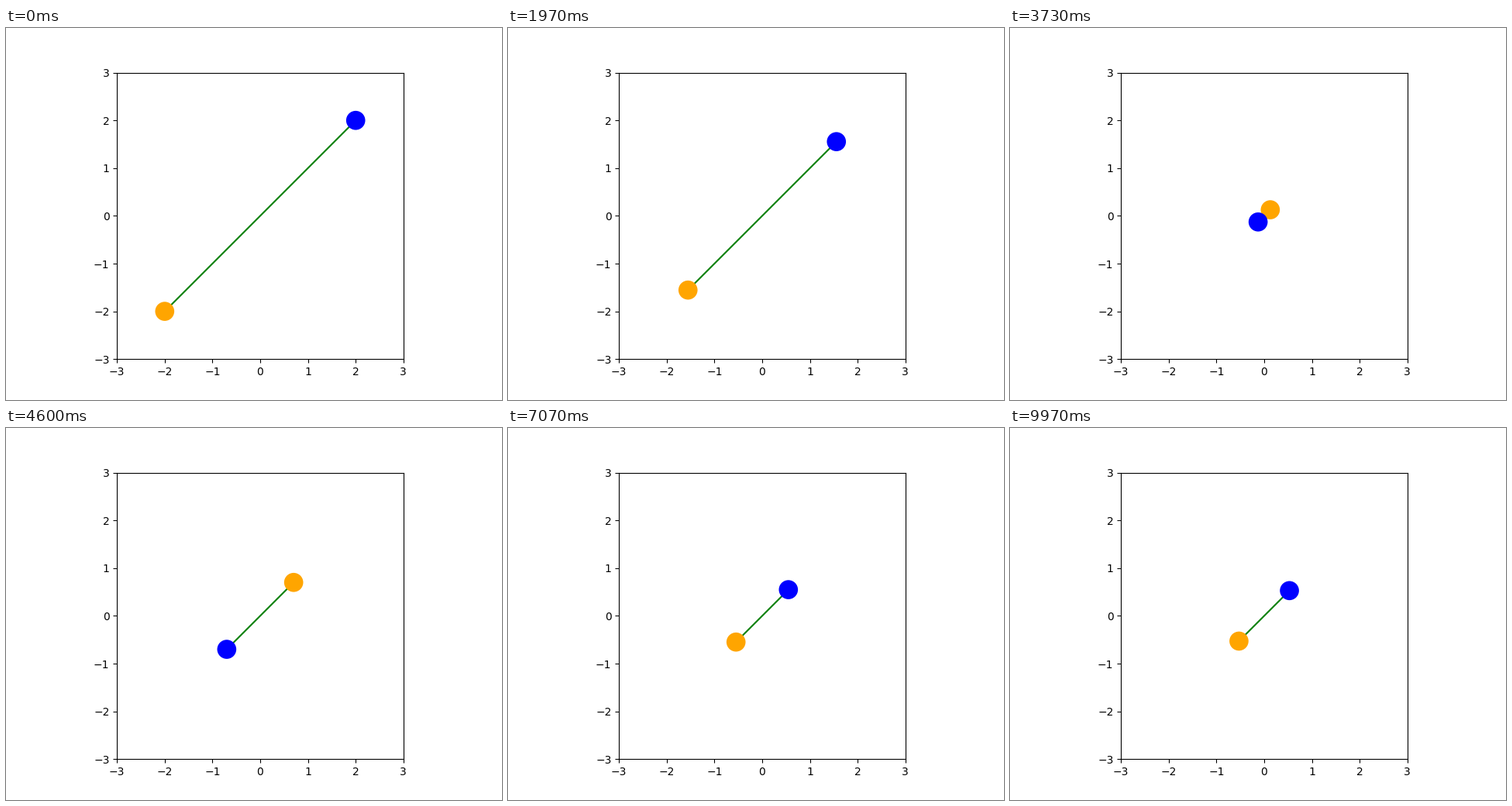
Animation of 640x480 px, one loop 10000 ms. Source, as a matplotlib script:

```python
import numpy as np
import matplotlib.pyplot as plt
from matplotlib.animation import FuncAnimation
from matplotlib.patches import Circle

FRAMES = 300
DURATION = 10.0     # seconds
START = 2.0         # initial offset of each mass on the diagonal
OMEGA = 6.3248      # angular frequency
DAMPING = 0.125     # decay rate
RADIUS = 0.2

# Damped oscillation released from rest
t = np.linspace(0, DURATION, FRAMES)
offset = START * np.exp(-DAMPING * t) * (
    np.cos(OMEGA * t) + DAMPING / OMEGA * np.sin(OMEGA * t))

fig, ax = plt.subplots(figsize=(6.4, 4.8), dpi=100)
ax.set_aspect("equal")
ax.set_xlim(-3, 3)
ax.set_ylim(-3, 3)
ax.set_xticks(range(-3, 4))
ax.set_yticks(range(-3, 4))

spring, = ax.plot([], [], color="green", lw=1.5, zorder=2)


def add_mass(color, zorder):
    return ax.add_patch(Circle((0, 0), RADIUS, fc=color, zorder=zorder))


orange = add_mass("orange", 3)
blue = add_mass("blue", 4)


def update(i):
    d = offset[i]
    blue.center = (d, d)
    orange.center = (-d, -d)
    spring.set_data([-d, d], [-d, d])
    return spring, orange, blue


anim = FuncAnimation(fig, update, frames=FRAMES, interval=1000 * DURATION / FRAMES,
                     repeat=True, repeat_delay=0)
plt.show()
```
